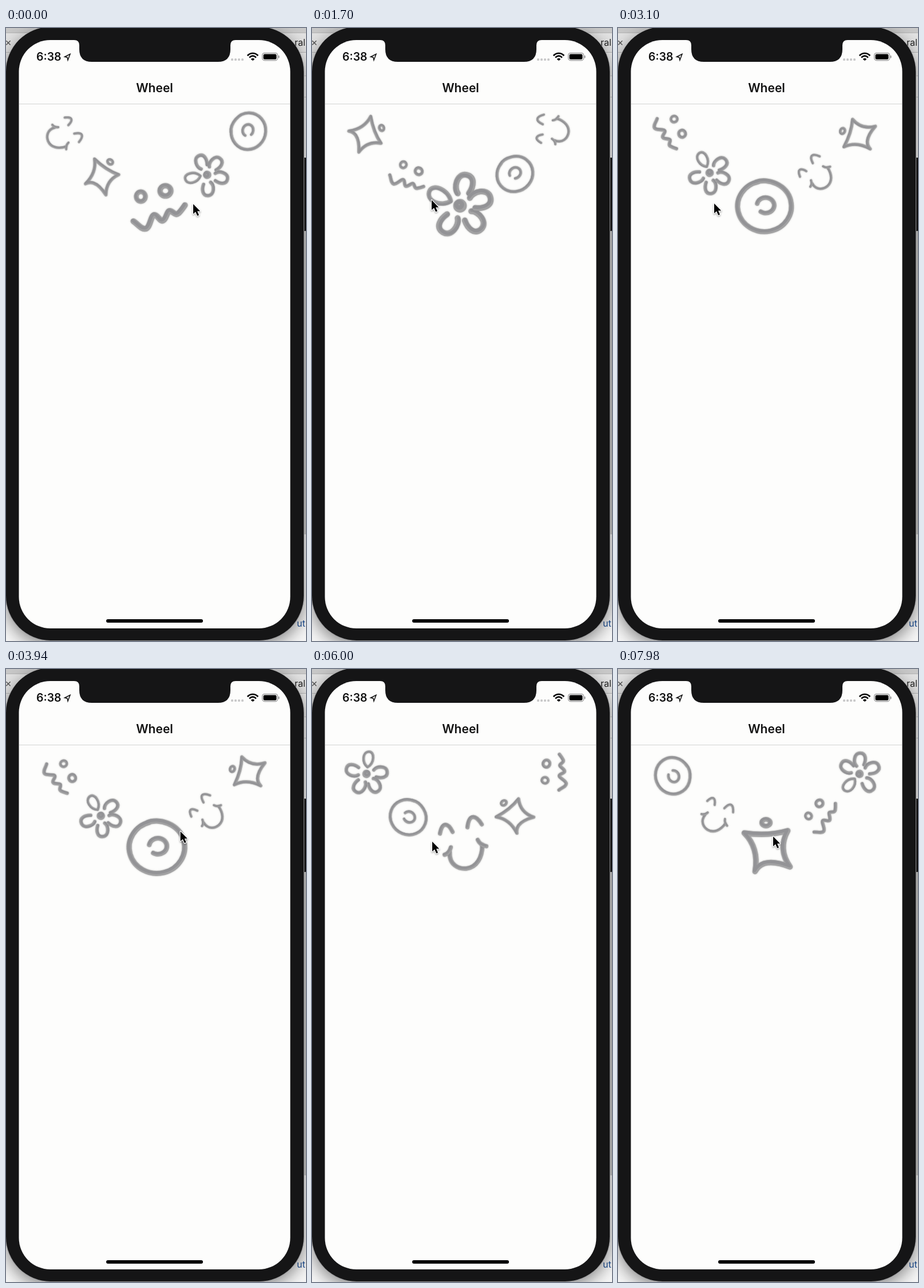
An HTML page with a canvas that plays this animation: 524x1069 px, repeating every 8000 ms.

```html
<!DOCTYPE html>
<html lang="en">
<head>
<meta charset="utf-8">
<title>Wheel</title>
<style>
html, body { margin: 0; width: 524px; height: 1069px; overflow: hidden; background: #e2e2e2; }
canvas { display: block; }
</style>
</head>
<body>
<canvas id="stage" width="524" height="1069"></canvas>
<script>
const ctx = document.getElementById('stage').getContext('2d');
const LOOP = 8000, STEP = 30, RAD = Math.PI / 180;
const HUB = { x: 258.5, y: 96, r: 185 };
const SANS = 'Inter, "Liberation Sans", sans-serif';

// time, pointer x, pointer y, wheel angle
const KEYS = [
  [0, 327, 307, 0], [300, 325, 308, 0], [1000, 172, 309, -34.5], [1150, 169, 310, -35.5],
  [1450, 172, 308, -30], [2150, 298, 281, -30], [2500, 298, 280, -30], [3100, 168, 306, -62],
  [3300, 170, 305, -60], [3800, 304, 283, -60], [4600, 312, 285, -60], [5480, 216, 301, -83],
  [5750, 210, 301, -90], [6050, 210, 301, -90], [6600, 300, 288, -90], [6750, 300, 288, -90],
  [7300, 166, 305, -122], [7480, 168, 304, -120], [7920, 271, 292, -120], [8000, 271, 292, -120]
];

const clamp = v => Math.max(0, Math.min(1, v));
const smooth = v => { v = clamp(v); return v * v * (3 - 2 * v); };

function poseAt(t) {
  let i = 0;
  while (i < KEYS.length - 2 && t >= KEYS[i + 1][0]) i++;
  const a = KEYS[i], b = KEYS[i + 1];
  const k = smooth((t - a[0]) / (b[0] - a[0]));
  const mix = n => a[n] + (b[n] - a[n]) * k;
  return { x: mix(1), y: mix(2), turn: mix(3) };
}

function ring(rx, ry, x, y, from = 0, to = 360) {
  const p = new Path2D();
  p.ellipse(x, y, rx, ry, 0, from * RAD, to * RAD);
  return p;
}

let weight = 1;

// Soft clay line: blurred light body with a darker ridge
function clay(path, width) {
  width *= weight;
  ctx.save();
  ctx.lineCap = ctx.lineJoin = 'round';
  ctx.lineWidth = width;
  ctx.strokeStyle = '#a2a2a3';
  ctx.shadowColor = 'rgba(120,120,120,.6)';
  ctx.shadowBlur = 2.5;
  ctx.stroke(path);
  ctx.shadowColor = 'transparent';
  ctx.translate(-width * .1, -width * .14);
  ctx.lineWidth = width * .55;
  ctx.strokeStyle = '#939396';
  ctx.stroke(path);
  ctx.restore();
}

const line = d => new Path2D(d);

const ZIGZAG = line('M-36 27C-28 32-22 42-14 40C-6 37-6 16 1 16C7 16 11 30 17 25C22 21 23 8 28 9C34 10 37 18 43 13Q48 8 54-1');
const DIAMOND = line('M-38-24Q4-18 38-28Q20 4 42 35Q14 24-3 29Q-14 33-19 43Q-12 2-38-24Z');
const PETAL = line('M20-9C28-19 54-19 55-2C56 14 38 15 25 10');
const LEAF = line('M18 0C28-17 55-20 59-3C62 13 32 17 18 0Z');

const icons = [
  function wave() {
    clay(ring(8, 8.5, -23, -16), 8);
    clay(ring(9.5, 9, 20, -26), 9);
    clay(ZIGZAG, 10);
  },
  function flower() {
    [50, 125, 207, 284, 346].forEach((deg, i) => {
      ctx.save();
      ctx.rotate(deg * RAD);
      clay(i === 2 ? LEAF : PETAL, i === 2 ? 7.5 : 10);
      ctx.restore();
    });
    clay(ring(5, 5, 0, 0), 13.5);
  },
  function target() {
    const p = line('M-12-42C8-51 44-40 52-11');
    p.addPath(ring(48.5, 45.5, 5, 1, -15, 255));
    clay(p, 9);
    clay(ring(15.5, 14, 7, -1, -170, 122), 8);
  },
  function smile() {
    clay(line('M-35-23C-31-44-21-42-13-26'), 7);
    clay(line('M13-34C16-59 28-55 38-39'), 7);
    clay(line('M-18 10C-19 32-2 39 11 38C29 36 39 19 39-3'), 7.5);
    clay(line('M-27 14Q-19 12-16 1M31-12Q35-3 46-1'), 7);
  },
  function sparkle() {
    clay(ring(7.5, 6, 0, -42), 8);
    clay(DIAMOND, 9.5);
  }
];

function wheel(turn) {
  ctx.save();
  ctx.beginPath();
  ctx.rect(23, 133.5, 473, 900);
  ctx.clip();
  for (let slot = -3; slot < 9; slot++) {
    const deg = slot * STEP + turn, off = Math.abs(deg);
    if (off > 100) continue;
    // outer slots run ahead, so they leave the view sooner
    const angle = (deg + Math.sign(deg) * 10 * (off / 90) ** 4) * RAD;
    const r = HUB.r + 29 * smooth((20 - off) / 9);
    const focus = clamp(1 - off / 22), size = .66 + .34 * focus;
    weight = .88 + .12 * focus;
    ctx.save();
    ctx.translate(HUB.x + r * Math.sin(angle), HUB.y + r * Math.cos(angle));
    ctx.rotate(-deg * 1.2 * RAD);
    ctx.scale(size, size);
    icons[(slot + 5) % 5]();
    ctx.restore();
  }
  ctx.restore();
}

function box(color, x, y, w, h, r = 0) {
  ctx.fillStyle = color;
  ctx.beginPath();
  ctx.roundRect(x, y, w, h, r);
  ctx.fill();
}

function text(str, x, y, font, color, align = 'left') {
  ctx.font = font + ' ' + SANS;
  ctx.fillStyle = color;
  ctx.textAlign = align;
  ctx.fillText(str, x, y);
}

function backdrop() {
  box('#f6f6f6', 0, 0, 524, 1069);
  box('#e2e2e2', 0, 0, 524, 84);
  box('#c8c8c8', 0, 0, 524, 8);
  box('#b4b4b4', 0, 8, 524, 1);
  box('#b8b8b8', 0, 42, 524, 1);
  box('#ededed', 505, 43, 19, 40);
  box('#c8c8c8', 505, 83, 19, 1);
  box('#c8c8c8', 516, 120, 8, 1);
  box('#cccccc', 516, 353, 8, 530);
  text('×', -2, 31, '400 18px', '#555');
  text('ral', 504, 31, '400 16px', '#222');
  text('ut', 508, 1044, '400 16px', '#1c4f96');
}

function phone() {
  box('#161617', 516, 226, 8, 128, 1);
  ctx.save();
  ctx.shadowColor = 'rgba(0,0,0,.45)';
  ctx.shadowBlur = 28;
  ctx.shadowOffsetY = 8;
  box('#9a9a9c', -1, -2, 522, 1071, 79);
  ctx.restore();
  box('#151516', 0, -2, 520, 1070, 78);
  box('#fdfdfc', 22.5, 21, 474, 1026, 55);
  ctx.fillStyle = '#151516';
  ctx.fill(line('M119 20H401V21Q392 21 392 30V37Q392 59 370 59H150Q128 59 128 37V30Q128 21 119 21Z'));
}

function statusBar() {
  text('6:38', 53, 57, '600 19.5px', '#111');
  ctx.strokeStyle = '#111';
  ctx.lineWidth = 1.5;
  ctx.lineJoin = 'miter';
  ctx.stroke(line('M112 45.5L102.5 50.3L107 51.2L108 56Z'));
  for (let i = 0; i < 4; i++) box('#c9c9ca', 393 + i * 6, 53, 4, 4, 1.5);

  ctx.save();
  ctx.clip(line('M431 57.5L419 45.5V38H443V45.5Z'));
  ctx.strokeStyle = '#000';
  ctx.lineWidth = 2.7;
  [2, 7.3, 12].forEach(r => ctx.stroke(ring(r, r, 431, 56)));
  ctx.restore();

  ctx.strokeStyle = '#8f8f90';
  ctx.lineWidth = 1.2;
  ctx.beginPath();
  ctx.roundRect(447.6, 43.6, 27, 13, 4);
  ctx.stroke();
  box('#000', 449.5, 45.5, 23, 9.2, 2.2);
  box('#8f8f90', 475.8, 48, 1.6, 4.5, 1);

  text('Wheel', 259.5, 112, '600 21px', '#111', 'center');
  box('#d2d3d2', 23, 132, 473, 1);
  box('#000', 175, 1031, 169, 6, 3);
}

function pointer(x, y) {
  ctx.save();
  ctx.translate(x, y);
  ctx.scale(.93, .93);
  const arrow = line('M0 0V18.5L4.4 14.6L7.7 22L10.8 20.6L7.6 13.5H13.2Z');
  ctx.lineJoin = 'round';
  ctx.strokeStyle = '#fff';
  ctx.lineWidth = 2.6;
  ctx.shadowColor = 'rgba(0,0,0,.35)';
  ctx.shadowBlur = 3;
  ctx.shadowOffsetY = 1.5;
  ctx.stroke(arrow);
  ctx.shadowColor = 'transparent';
  ctx.fillStyle = '#000';
  ctx.fill(arrow);
  ctx.restore();
}

const start = performance.now();
function frame() {
  const pose = poseAt((performance.now() - start) % LOOP);
  backdrop();
  phone();
  wheel(pose.turn);
  statusBar();
  pointer(pose.x, pose.y);
  requestAnimationFrame(frame);
}
frame();
</script>
</body>
</html>
```
